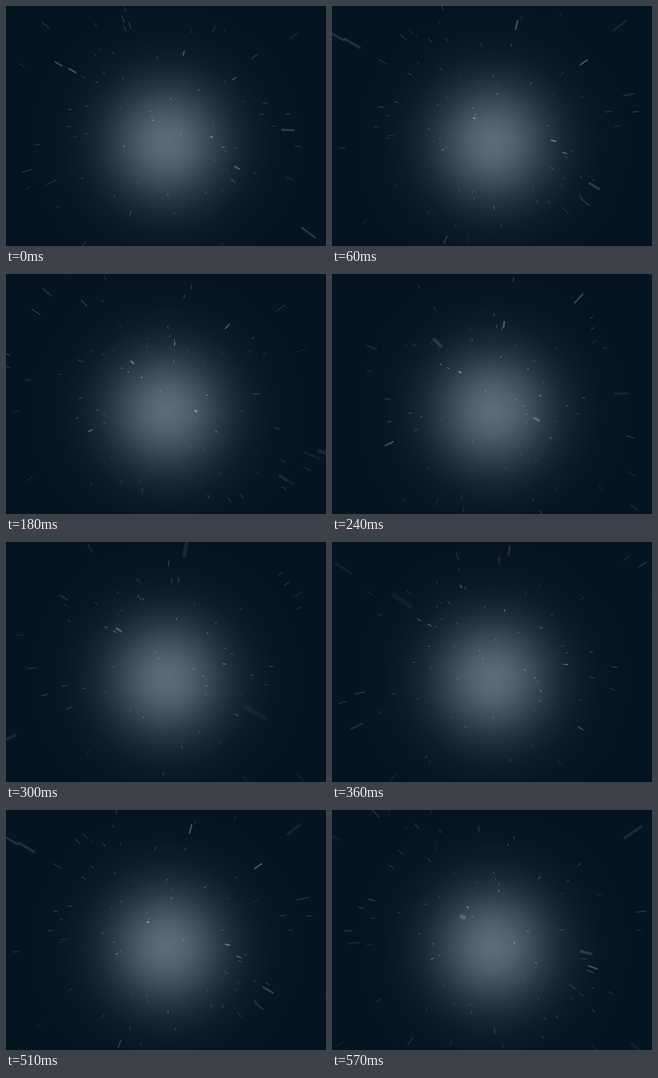
Animation of 400 by 300 pixels, one loop 600 ms. Source, as an HTML page with a canvas:

```html
<!DOCTYPE html>
<html lang="en">
<head>
<meta charset="utf-8">
<title>Star warp</title>
<style>
  html, body { margin: 0; width: 100%; height: 100%; overflow: hidden; background: #051421; }
  canvas { display: block; width: 400px; height: 300px; }
</style>
</head>
<body>
<canvas id="sky" width="400" height="300"></canvas>
<script>
const ctx = document.getElementById('sky').getContext('2d');
const LOOP = 600, STEP = 30;
const NEAR = 52, PERIOD = 450;  // depth is measured in ms of travel
const TRAIL = 14;               // streak exposure in ms
const CX = 200, CY = 150;

let seed = 29;
const random = () => (seed = seed * 16807 % 2147483647) / 2147483647;

// Stars passing close to the viewer.
// x, y: offset from the vanishing point at depth 100; z: depth at time zero
const closeStars = [
  [-34, -15, 213], [-66, -62, 337], [-75, -51, 427], [67, 38, 360],
  [23, -134, 394], [48, -197, 216], [133, 32, 233], [197, 73, 276],
  [175, 103, 197], [262, 196, 147], [210, 7, 138], [199, -138, 233],
  [157, -173, 385], [-213, -126, 182], [-256, -148, 191], [-213, 103, 406]
].map(([x, y, z]) => ({ x, y, z, strength: .62 }));

const distantStars = Array.from({ length: 100 }, () => {
  const angle = random() * Math.PI * 2;
  const radius = 220 + random() * 500;
  return {
    x: Math.cos(angle) * radius,
    y: Math.sin(angle) * radius,
    z: NEAR + random() * PERIOD,
    strength: .2 + random() * .22
  };
});

const stars = [...distantStars, ...closeStars];

function makeGlow(x, y, radius, sigma, peak) {
  const glow = ctx.createRadialGradient(x, y, 0, x, y, radius);
  const steps = 24;
  for (let i = 0; i <= steps; i++) {
    const r = radius * i / steps;
    const alpha = i < steps ? peak * Math.exp(-r * r / (2 * sigma * sigma)) : 0;
    glow.addColorStop(i / steps, `rgba(235,248,255,${alpha.toFixed(4)})`);
  }
  return glow;
}
const glow = makeGlow(201, 171, 170, 52, .38);

function drawStar({ x, y, z: z0, strength }, time) {
  const z = NEAR + (z0 - time - NEAR + 2 * PERIOD) % PERIOD;
  const dx = x * 100 / z, dy = y * 100 / z;
  const r = Math.hypot(dx, dy);
  const length = Math.max(1.1, r * TRAIL / z);
  const width = Math.min(6, Math.max(.9, .4 + 40000 / (z * z)));
  const half = Math.max(.5, length - width * .5) / 2;
  const ux = dx / r * half, uy = dy / r * half;

  // The light spreads along the streak and blurs out close to the viewer.
  ctx.globalAlpha = strength * Math.min(1, (z / 170) ** 1.3) / (1 + length / 11);
  ctx.lineWidth = width;
  ctx.beginPath();
  ctx.moveTo(CX + dx - ux, CY + dy - uy);
  ctx.lineTo(CX + dx + ux, CY + dy + uy);
  ctx.stroke();
}

function draw(time) {
  ctx.globalAlpha = 1;
  ctx.fillStyle = '#051421';
  ctx.fillRect(0, 0, 400, 300);
  ctx.fillStyle = glow;
  ctx.fillRect(0, 0, 400, 300);

  ctx.strokeStyle = '#e4ecf0';
  ctx.lineCap = 'round';
  stars.forEach(star => drawStar(star, time));
}

const start = performance.now();
function tick() {
  const time = (performance.now() - start) % LOOP;
  draw(Math.floor(time / STEP) * STEP);
  requestAnimationFrame(tick);
}
tick();
</script>
</body>
</html>
```
